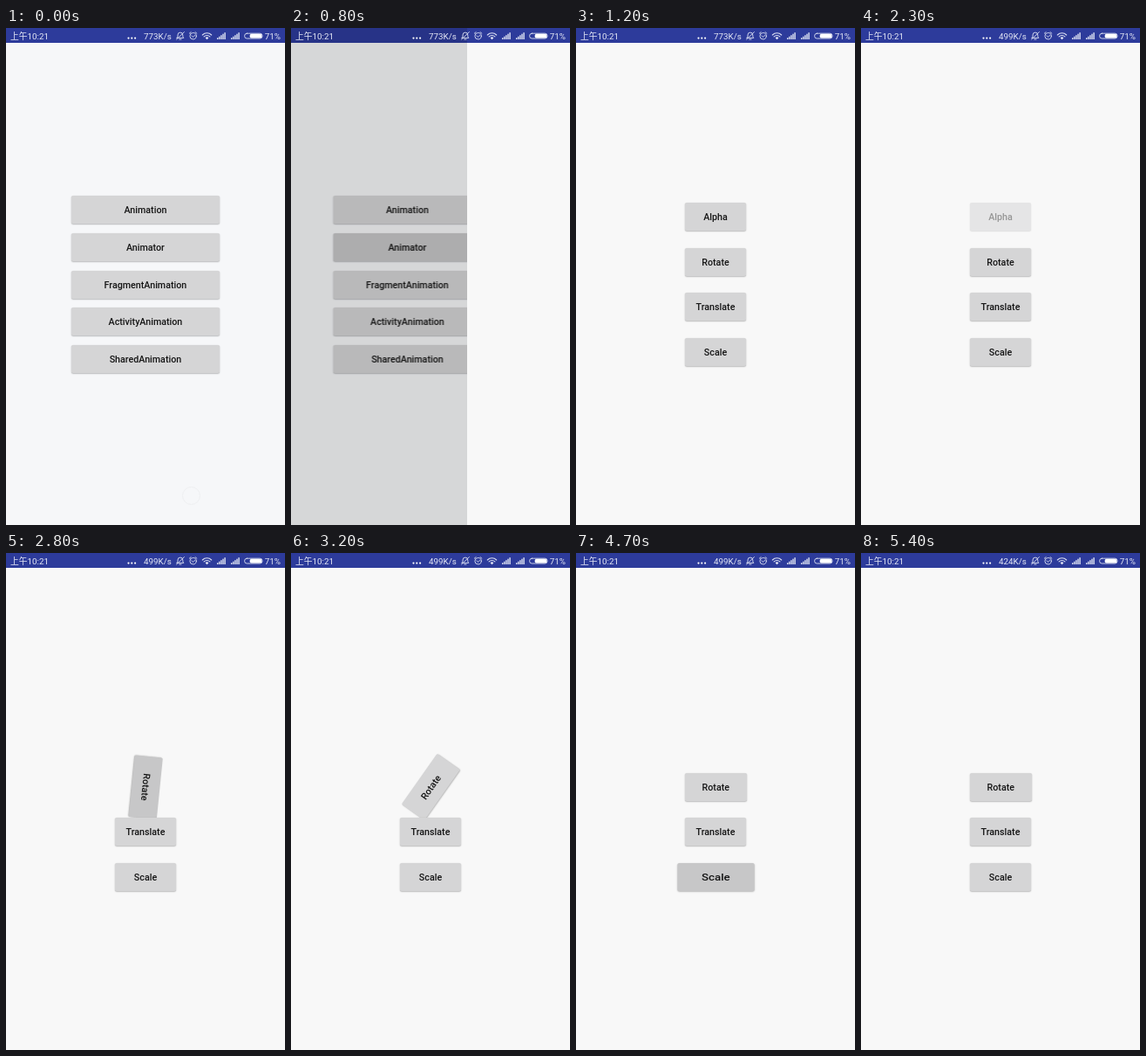
An HTML page that plays this animation: 320 px wide and 569 px high, repeating every 6000 ms.

```html
<!DOCTYPE html>
<html lang="zh">
<head>
<meta charset="utf-8">
<title>Animation demo</title>
<style>
  html, body { margin: 0; width: 100%; height: 100%; overflow: hidden; }
  #stage { position: relative; width: 320px; height: 569px; overflow: hidden; background: #f6f7f9; }
  .page { position: absolute; inset: 0; will-change: transform; }
  .page::before { content: ""; position: absolute; left: 0; top: 0; width: 100%; height: 17px; background: #2d3b9b; }
  #menu { background: #f6f7f9; }
  #demo { background: #f8f8f8; }
  #dim { position: absolute; inset: 0; background: #000; opacity: 0; }
  .btn {
    position: absolute; height: 32.2px; border-radius: 1.8px; overflow: hidden;
    background: #d5d5d6; box-shadow: 0 .8px 1.6px rgba(0, 0, 0, .3);
    font: 500 10.7px/34px Roboto, sans-serif; color: #151515; text-align: center; white-space: nowrap;
  }
  .btn::after { content: ""; position: absolute; inset: 0; background: #000; opacity: var(--press, 0); }
  #menu .btn { left: 74.6px; width: 170.7px; }
  #demo .btn { left: 124.7px; width: 70.6px; }
  #touch {
    position: absolute; left: 202px; top: 525px; width: 19px; height: 19px; border-radius: 50%;
    border: 1px solid #eeeff1; background: #f6f7f9;
  }
  #status { position: absolute; left: 0; top: 0; }
  #status text { font: 400 9.8px Roboto, "Noto Sans CJK SC", "Noto Sans CJK", sans-serif; fill: #e6e9f6; }
</style>
</head>
<body>
<div id="stage">
  <div id="menu" class="page"><div id="touch"></div></div>
  <div id="dim"></div>
  <div id="demo" class="page"></div>
  <svg id="status" width="320" height="18" viewBox="0 0 320 18" fill="none" stroke="#dde1f3" stroke-width=".9" stroke-linecap="round">
    <g stroke="none">
      <text x="5" y="12.9">上午10:21</text>
      <text id="speed" x="189.8" y="12.9" text-anchor="end">773K/s</text>
      <text x="296.8" y="12.9">71%</text>
    </g>
    <g stroke="none" fill="#fff">
      <circle cx="140.5" cy="11.6" r="1.1"/><circle cx="144.3" cy="11.6" r="1.1"/><circle cx="148.1" cy="11.6" r="1.1"/>
    </g>
    <!-- muted bell -->
    <path d="M196 11.4h7.8l-1-1.5V8a2.9 2.9 0 0 0-5.8 0v1.9zM198.8 13h2.2M204.4 4.6l-8.8 8.4"/>
    <!-- alarm clock -->
    <circle cx="214.6" cy="9.2" r="3.7"/>
    <path d="M210.3 6.2l1.8-1.5M218.9 6.2l-1.8-1.5M212.9 8.8l1.6 1.5 2-1.9"/>
    <!-- wifi -->
    <path d="M225.3 8a7.3 7.3 0 0 1 10.4 0M227.1 9.9a4.8 4.8 0 0 1 6.8 0" stroke-width="1.1"/>
    <path d="M228.6 11.3a2.7 2.7 0 0 1 3.8 0l-1.9 2z" fill="#e8ebf8" stroke="none"/>
    <g id="bars" stroke="none" fill="#e0e4f4"></g>
    <!-- battery -->
    <rect x="273.6" y="6.2" width="20.4" height="5.8" rx="2.7"/>
    <rect x="279.6" y="6.8" width="13.8" height="4.6" rx="2" fill="#fff" stroke="none"/>
  </svg>
</div>
<script>
  const LOOP = 6000;
  const $ = id => document.getElementById(id);

  function addButtons(page, labels, top, pitch) {
    return labels.map((label, i) => {
      const b = document.createElement("div");
      b.className = "btn";
      b.textContent = label;
      b.style.top = top + i * pitch + "px";
      page.append(b);
      return b;
    });
  }

  const menu = $("menu"), demo = $("demo"), dim = $("dim"), touch = $("touch"), speed = $("speed");
  const [, animator] = addButtons(menu,
    ["Animation", "Animator", "FragmentAnimation", "ActivityAnimation", "SharedAnimation"], 192.2, 42.7);
  const [alpha, rotate, translate, scale] = addButtons(demo,
    ["Alpha", "Rotate", "Translate", "Scale"], 200.2, 51.55);

  // two signal meters, five rising bars each
  for (const x of [242, 258]) {
    for (let i = 0; i < 5; i++) {
      const h = 1.8 + i * 1.5;
      $("bars").innerHTML += `<rect x="${x + i * 2.1}" y="${13 - h}" width="1.4" height="${h}"/>`;
    }
  }

  const clamp = v => Math.min(1, Math.max(0, v));
  const part = (t, start, length) => clamp((t - start) / length);
  const smooth = (t, start) => (1 - Math.cos(Math.PI * part(t, start, 1000))) / 2;

  // piecewise linear through evenly spaced values
  function through(values, f) {
    const p = f * (values.length - 1);
    const i = Math.min(Math.floor(p), values.length - 2);
    return values[i] + (values[i + 1] - values[i]) * (p - i);
  }

  function press(button, t, start) {
    const level = part(t, start, 90) * (1 - part(t, start + 450, 300));
    button.style.setProperty("--press", .065 * level);
  }

  function draw(t) {
    const slide = 1 - (1 - part(t, 719, 400)) ** 2;
    menu.style.transform = `translateX(${-72 * slide}px)`;
    demo.style.transform = `translateX(${320 * (1 - slide)}px)`;
    dim.style.opacity = .355 * slide;
    touch.style.opacity = t < 600 ? 1 : 0;

    press(animator, t, 590);
    press(alpha, t, 1690);
    press(rotate, t, 2390);
    press(translate, t, 3390);
    press(scale, t, 4340);

    alpha.style.opacity = 1 - smooth(t, 1755);
    rotate.style.transform = `rotate(${360 * smooth(t, 2456)}deg)`;
    translate.style.transform = `translateX(${through([0, 29.6, -29.6, 0], smooth(t, 3432))}px)`;
    scale.style.transform = `scaleX(${through([1, 1.5, 1], smooth(t, 4372))})`;

    speed.textContent = (t < 1395 ? 773 : t < 5395 ? 499 : 424) + "K/s";
  }

  const began = performance.now();
  function tick() {
    draw((performance.now() - began) % LOOP);
    requestAnimationFrame(tick);
  }
  tick();
</script>
</body>
</html>
```
